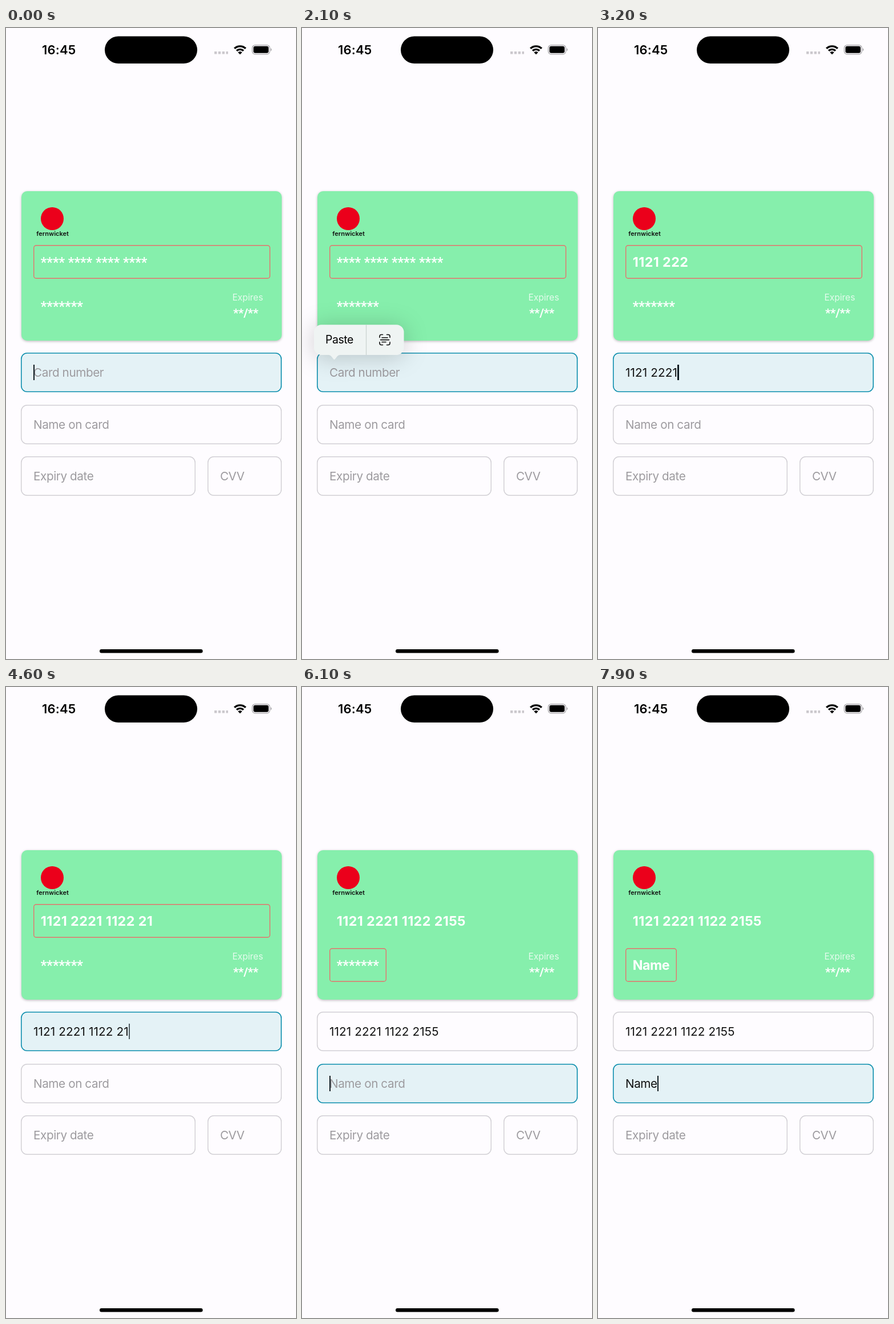
Animation of 508x1102 px, one loop 8 s. Source, as an HTML page:

```html
<!DOCTYPE html>
<html lang="en">
<head>
<meta charset="utf-8">
<title>Card form</title>
<style>
  html, body { margin: 0; width: 100%; height: 100%; overflow: hidden; background: #fefcff; }
  body { position: relative; font-family: Inter, sans-serif; color: #111; }
  body * { box-sizing: border-box; }
  svg, .abs, .field, .line { position: absolute; white-space: pre; }

  .card { left: 27.3px; top: 284.5px; width: 456px; height: 261.3px; border-radius: 10px;
    background: #86efac; box-shadow: 0 1.3px 4px rgba(0, 0, 0, .27); }
  .line { left: 48px; height: 59.3px; padding: 0 12.8px; border-radius: 5px;
    font-size: 23.3px; line-height: 60px; font-weight: 700; letter-spacing: -.5px; color: #fff; }
  .line.active { box-shadow: inset 0 0 0 1.4px #e5736d; }
  .masked { font-family: Roboto, sans-serif; font-weight: 700; letter-spacing: 0; color: #fff; }
  #cardNumber:not(.masked) { letter-spacing: .4px; }

  .field { height: 69.6px; padding-left: 22.3px; border-radius: 11px; box-shadow: inset 0 0 0 1.5px #d2d0d5;
    font-size: 20.68px; line-height: 69.6px; letter-spacing: -.4px; }
  .field.active { box-shadow: inset 0 0 0 1.6px #0e8fae; background: #e4f2f6; }
  #number { letter-spacing: .13px; }
  .field .hint, .hint { color: #9d9b9f; letter-spacing: -.4px; }
  .caret { position: absolute; top: 21.5px; width: 2.5px; height: 26.5px; background: #101c22; }

  #menu { left: 0; top: 0; width: 508px; height: 640px; transform-origin: 56.5px 579px;
    filter: drop-shadow(0 3px 20px rgba(0, 0, 0, .2)); }
</style>
</head>
<body>
  <div class="abs" style="left:63px;top:24px;font-size:22px;line-height:28px;font-weight:600;letter-spacing:.2px;color:#000">16:45</div>
  <svg width="508" height="1102" style="left:0;top:0">
    <rect x="173" y="14.5" width="162" height="47.5" rx="23.75"/>
    <path d="M367 43.3h24" stroke="#cbc8cd" stroke-width="4.4" stroke-dasharray="4.4 2.4" transform="translate(-2)"/>
    <g fill="none" stroke="#000" stroke-width="3.3">
      <path d="M400.2 35.8a14 14 0 0 1 19.6 0"/>
      <path d="M404 39.8a8.6 8.6 0 0 1 12 0"/>
    </g>
    <path d="M410 46.3l-3.7-3.8a5.3 5.3 0 0 1 7.4 0z"/>
    <rect x="431.4" y="29.8" width="30.6" height="16" rx="5" fill="none" stroke="#a5a3a7" stroke-width="1.3"/>
    <rect x="433.4" y="31.8" width="26.6" height="12" rx="3.2"/>
    <path d="M463.7 35.2a2.8 2.8 0 0 1 0 5.2z" fill="#a5a3a7"/>
    <rect x="164" y="1085" width="180.6" height="6.4" rx="3.2"/>
  </svg>

  <div class="abs card"></div>
  <div class="abs" style="left:60.5px;top:313px;width:40px;height:40px;border-radius:50%;background:#eb001b"></div>
  <div class="abs" style="left:48px;top:353px;width:67px;text-align:center;font-size:11px;line-height:13px;font-weight:600">fernwicket</div>
  <div class="line" id="cardNumber" style="top:378.7px;width:414.6px"></div>
  <div class="line" id="cardName" style="top:456px"></div>
  <div class="abs" style="left:396.5px;top:460px;font-size:15.5px;line-height:21px;color:rgba(255,255,255,.78)">Expires</div>
  <div class="abs masked" style="left:398px;top:484px;font-size:20.7px;line-height:28px;letter-spacing:-.3px">**/**</div>

  <div class="field" id="number" style="left:25.7px;top:566.8px;width:457px"></div>
  <div class="field" id="name" style="left:25.7px;top:657.5px;width:457px"></div>
  <div class="field hint" style="left:25.7px;top:747.8px;width:306px">Expiry date</div>
  <div class="field hint" style="left:352.6px;top:747.8px;width:130px">CVV</div>

  <div class="abs" id="menu">
    <svg width="508" height="640" style="left:0;top:0">
      <path fill="#eff4f3" d="M34 518.3H165.5a13 13 0 0 1 13 13V558a13 13 0 0 1-13 13H66.5Q64 571 62 573L58 578Q56.5 580 55 578L51 573Q49 571 46.5 571H34a13 13 0 0 1-13-13V531.3a13 13 0 0 1 13-13z"/>
      <path d="M112.5 518.3V571" stroke="#cad2cf" stroke-width="1.2"/>
      <path d="M136 540.5v-2a3 3 0 0 1 3-3h2.5M148.5 535.5h2.5a3 3 0 0 1 3 3v2M154 548.5v2a3 3 0 0 1-3 3h-2.5M141.5 553.5h-2.5a3 3 0 0 1-3-3v-2M140 540.7h10M137.5 544.6h15M140 548.5h7"
        fill="none" stroke="#111" stroke-width="1.6" stroke-linecap="round"/>
    </svg>
    <div class="abs" style="left:41px;top:531px;font-size:19.4px;line-height:27px;letter-spacing:-.4px;color:#000">Paste</div>
  </div>

<script>
const LOOP = 8000, MENU_OPEN = 1780, MENU_CLOSE = 2260, NAME_FOCUS = 6045, CARD_LAG = 90;
const DIGITS = '1121222111222155', NAME = 'Name';
const digitTimes = [...DIGITS].map((_, i) => i < 14 ? MENU_CLOSE + 134 * i : [4805, 5105][i - 14]);
const nameTimes = [7480, 7690, 7790, 7890];
// The first entry sets the phase of the caret that is already blinking.
const caretResets = [-390, ...digitTimes, NAME_FOCUS, ...nameTimes];

const $ = id => document.getElementById(id);
const clamp = v => Math.max(0, Math.min(1, v));
const typed = (text, times, t) => text.slice(0, times.filter(time => time <= t).length);
const grouped = digits => digits.replace(/(.{4})(?=.)/g, '$1 ');

function caretAlpha(t) {
  if (t >= MENU_OPEN && t < MENU_CLOSE) return clamp(1 - (t - MENU_OPEN) / 150);
  const idle = t - caretResets.filter(time => time <= t).pop() - 550;
  if (idle < 0) return 1;
  const phase = idle % 1000;
  return phase < 160 ? 1 - phase / 160 : clamp((phase - 320) / 200);
}

function showField(id, value, hint, active, alpha) {
  const caret = active ? `<i class="caret" style="opacity:${alpha}"></i>` : '';
  $(id).innerHTML = value ? value + caret : caret + `<span class="hint">${hint}</span>`;
  $(id).classList.toggle('active', active);
}

function showLine(id, value, mask, active) {
  const line = $(id);
  line.textContent = value || mask;
  line.classList.toggle('masked', !value);
  line.classList.toggle('active', active);
}

function showMenu(t) {
  const grow = 1 - (1 - clamp((t - MENU_OPEN) / 300)) ** 3;
  const opacity = grow * (1 - clamp((t - MENU_CLOSE) / 200));
  $('menu').style.opacity = opacity;
  $('menu').style.visibility = opacity ? 'visible' : 'hidden';
  $('menu').style.transform = `scale(${.4 + .6 * grow})`;
}

function render(t) {
  const onName = t >= NAME_FOCUS, alpha = caretAlpha(t), name = typed(NAME, nameTimes, t);
  showField('number', grouped(typed(DIGITS, digitTimes, t)), 'Card number', !onName, alpha);
  showField('name', name, 'Name on card', onName, alpha);
  showLine('cardNumber', grouped(typed(DIGITS, digitTimes, t - CARD_LAG)), '**** **** **** ****', !onName);
  showLine('cardName', name, '*******', onName);
  showMenu(t);
}

const start = performance.now();
function tick() {
  render((performance.now() - start) % LOOP);
  requestAnimationFrame(tick);
}
tick();
</script>
</body>
</html>
```
